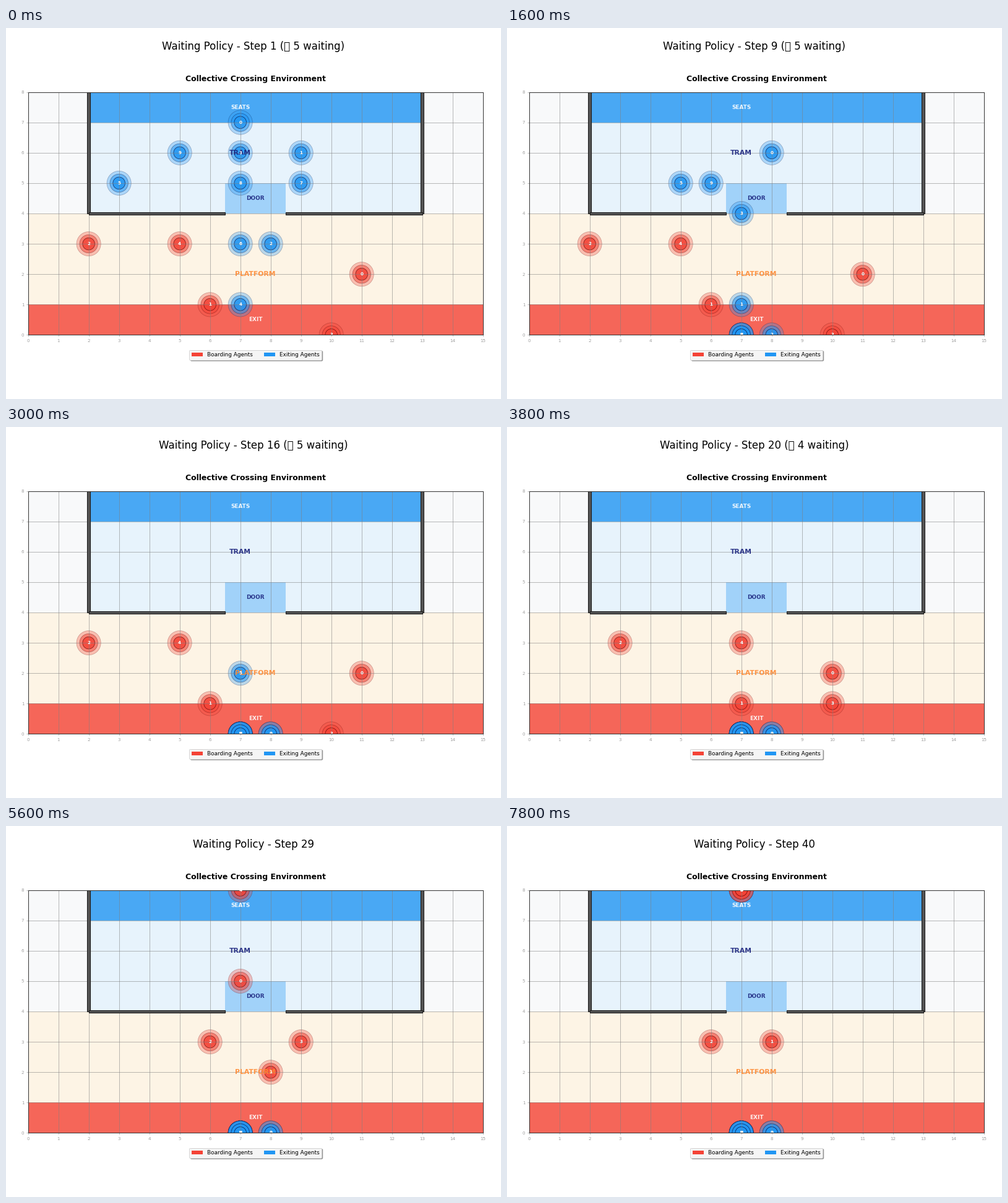
Recreate the animation shown at these times as a matplotlib script. Size 800x600 px, loop 8000 ms.

```python
import matplotlib.pyplot as plt
from matplotlib.animation import FuncAnimation
from matplotlib.patches import Circle, Patch, Rectangle

STEPS, INTERVAL = 40, 200
K = 0.643  # scale of the map's type and line weights
RED, BLUE = "#F44336", "#2196F3"
MOVES = {"L": (-1, 0), "R": (1, 0), "U": (0, 1), "D": (0, -1), ".": (0, 0)}
HOLD = "." * 17

# start cell and one move per step; agents stay put when moves run out
BOARDING = [
    (11, 2, HOLD + "L.L.U.." + "LLUUUUU"),
    (6, 1, HOLD + "R.R.U.." + "." * 14 + "U"),
    (2, 3, HOLD + "R.R.R.." + "R"),
    (10, 0, HOLD + "U.U.L.." + ".U....." + "LLUUUUU"),
    (5, 3, HOLD + "RRUUUUU"),
]
EXITING = [
    (7, 7, "......R" + "D" * 7),
    (9, 6, ".DLL" + "D" * 5),
    (8, 3, "DDD"),
    (7, 6, "......" + "D" * 6),
    (7, 1, "D"),
    (3, 5, "....RR....RR" + "D" * 5),
    (7, 3, "DDD"),
    (9, 5, "LL" + "D" * 5),
    (7, 5, "D" * 5),
    (5, 6, "RD.......R" + "D" * 5),
]

plt.rcParams["font.family"] = "DejaVu Sans"
plt.rcParams["patch.linewidth"] = K

fig = plt.figure(figsize=(8, 6), dpi=100, facecolor="white")
ax = fig.add_axes([35.6 / 800, 1 - 496.4 / 600, 735.2 / 800, 392.8 / 600])
ax.set(xlim=(0, 15), ylim=(0, 8), xticks=range(16), yticks=range(9),
       facecolor="#F8F9FA")
ax.grid(color="gray", alpha=0.6, lw=K)
ax.tick_params(color="#A0A0A0", labelcolor="#A0A0A0", labelsize=8 * K,
               length=3.5 * K, width=0.8 * K, pad=3.5 * K)
for spine in ax.spines.values():
    spine.set(color="#333333", linewidth=1.1 * K)


def zone(x, y, w, h, color):
    ax.add_patch(Rectangle((x, y), w, h, fc=color, ec="none", alpha=0.8))


def wall(x, y, w, h):
    ax.add_patch(Rectangle((x, y), w, h, fc="#555555", ec="#1C1C1C",
                           lw=1.2 * K, zorder=1.8))


def label(x, y, text, size, color, alpha=0.9):
    return ax.text(x, y, text, fontsize=size * K, color=color, alpha=alpha,
                   weight="bold", ha="center", va="center", clip_on=True)


zone(0, 0, 15, 4, "#FFF3E0")
zone(2, 4, 11, 4, "#E3F2FD")
zone(6.5, 4, 2, 1, "#90CAF9")
zone(2, 7, 11, 1, BLUE)
zone(0, 0, 15, 1, RED)

wall(1.95, 4, 0.1, 4)
wall(12.95, 4, 0.1, 4)
wall(2, 3.95, 4.5, 0.1)
wall(8.5, 3.95, 4.5, 0.1)

label(7, 7.5, "SEATS", 10, "white")
label(7, 6, "TRAM", 12, "#1A237E")
label(7.5, 4.5, "DOOR", 10, "#1A237E")
label(7.5, 2, "PLATFORM", 12, "#FF8A33")
label(7.5, 0.5, "EXIT", 10, "white")

fig.text(403 / 800, 1 - 86.3 / 600, "Collective Crossing Environment",
         fontsize=14 * K, weight="bold", ha="center")
title = fig.text(399.7 / 800, 1 - 35 / 600, "", fontsize=12, ha="center")

ax.legend(handles=[Patch(fc=RED, lw=0, label="Boarding Agents"),
                   Patch(fc=BLUE, lw=0, label="Exiting Agents")],
          loc="upper center", bbox_to_anchor=(0.5, -0.05), ncol=2,
          fontsize=10 * K, fancybox=True,
          shadow={"ox": 2 * K, "oy": -2 * K}, framealpha=0.9)


class Agent:
    RINGS = ((0.4, 0.3, 0.8), (0.3, 0.5, 0.7), (0.2, 0.8, 0.8))

    def __init__(self, number, x, y, moves, color, edge):
        self.cells = [(x, y)]
        for move in moves.ljust(STEPS - 1, "."):
            dx, dy = MOVES[move]
            x, y = x + dx, y + dy
            self.cells.append((x, y))
        self.rings = [ax.add_patch(Circle((x, y), r, fc=color, ec=edge,
                                          alpha=alpha, lw=lw * K))
                      for r, alpha, lw in self.RINGS]
        self.text = label(x, y, str(number), 8, "white", 1)

    def place(self, i):
        for ring in self.rings:
            ring.center = self.cells[i]
        self.text.set_position(self.cells[i])


agents = [Agent(n, *spec, RED, "#5A0000") for n, spec in enumerate(BOARDING)]
agents += [Agent(n, *spec, BLUE, "#000A3C") for n, spec in enumerate(EXITING)]


def waiting(step):
    if step <= 18:
        return 5
    return 4 if step <= 25 else 0


def update(i):
    step = i + 1
    count = waiting(step)
    note = f" (\U0001F6B6 {count} waiting)" if count else ""
    title.set_text(f"Waiting Policy - Step {step}{note}")
    for agent in agents:
        agent.place(i)
    return []


anim = FuncAnimation(fig, update, frames=STEPS, interval=INTERVAL,
                     init_func=lambda: update(0), repeat=True, blit=False)
plt.show()
```
